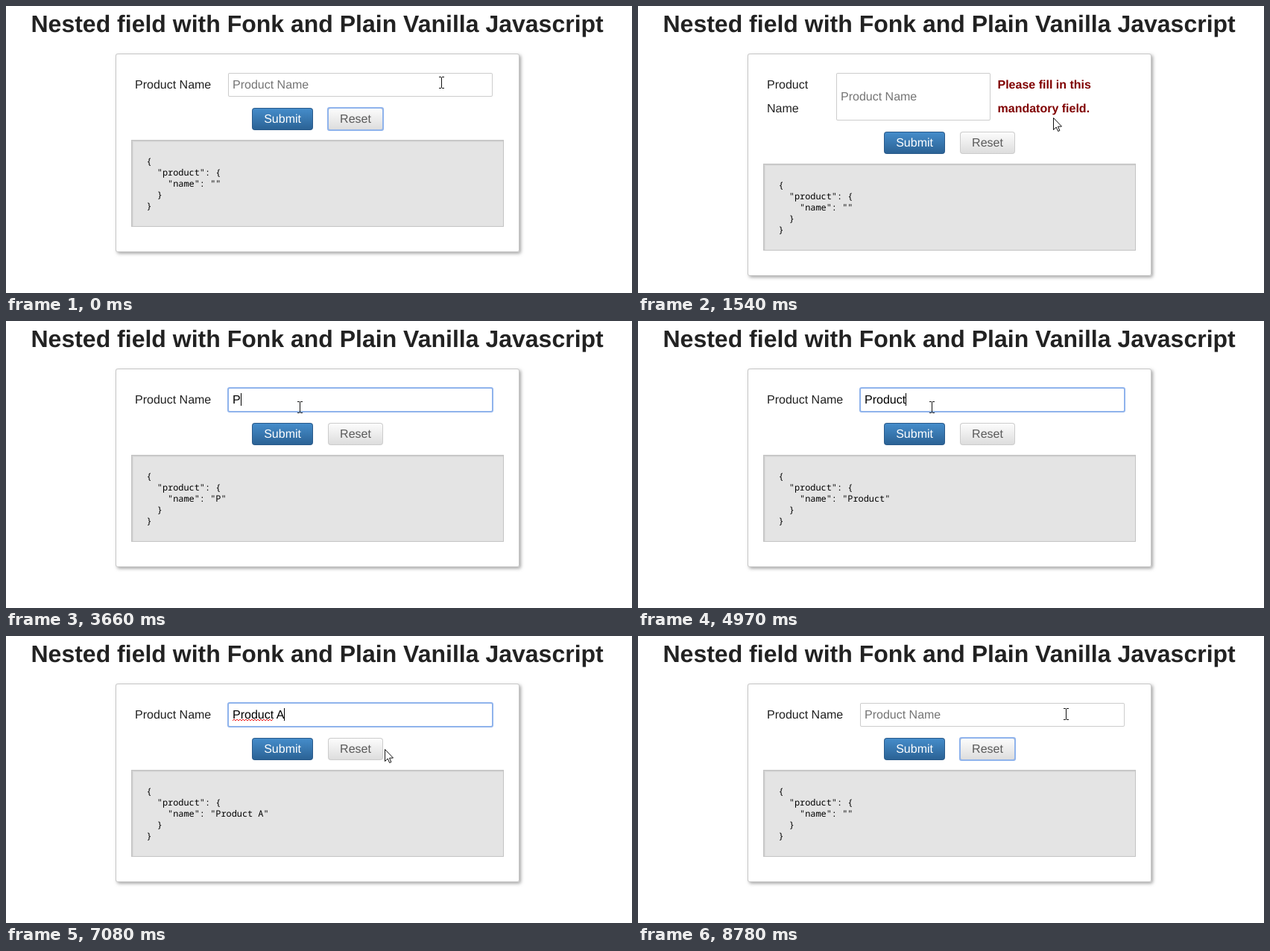
An HTML page with a canvas for the animation above (9090 ms loop, 840 by 386 pixels).

```html
<!DOCTYPE html>
<html lang="en">
<head>
<meta charset="utf-8">
<title>Nested field</title>
<style>
html, body { margin: 0; width: 100%; height: 100%; overflow: hidden; background: #fff; }
canvas { display: block; }
</style>
</head>
<body>
<canvas id="stage" width="840" height="386"></canvas>
<script>
const ctx = document.getElementById('stage').getContext('2d');
const SANS = '16px "Liberation Sans", Arial, sans-serif';
const MONO = '11.9px "Noto Sans Mono", monospace';
const LOOP = 9090;
const BLINK = 530;

// Pointer moves: start, end, number of steps, waypoints.
const moves = [
  { from: 920, to: 1220, steps: 5, path: [[584, 103], [576, 118], [557, 150]] },
  { from: 1860, to: 2180, steps: 5, path: [[557, 150], [535, 155], [470, 143], [394, 116]] },
  { from: 6300, to: 7160, steps: 12, hold: true,
    path: [[398, 116], [465, 118], [535, 138], [554, 153], [540, 155], [505, 152], [474, 148]] },
  { from: 7230, to: 7470, steps: 4, path: [[474, 148], [461, 147]] },
  { from: 7920, to: 8460, steps: 8, hold: true, path: [[461, 147], [485, 134], [530, 113], [583, 102]] },
  { from: 8630, to: 8780, steps: 3, path: [[583, 102], [574, 105]] }
];

// Value of the field and the time of each change.
const typing = [[3660, 'P'], [4120, 'Pr'], [4270, 'Pro'], [4420, 'Prod'], [4590, 'Produ'],
  [4740, 'Produc'], [4970, 'Product'], [5290, 'Product '], [5750, 'Product A'], [7920, '']];

const ticks = [0, 610, 1540, 2710, 3260, 5370, 7770, ...typing.map(([at]) => at)];
for (const m of moves) {
  for (let i = 0; i < m.steps; i++) ticks.push(m.from + (m.to - m.from) * i / (m.steps - 1));
}

const within = (t, a, b) => t >= a && t < b;

function along(path, p) {
  const at = p * (path.length - 1);
  const i = Math.min(Math.floor(at), path.length - 2);
  return path[i].map((v, axis) => Math.round(v + (path[i + 1][axis] - v) * (at - i)));
}

function pointerAt(t) {
  let pos = moves[0].path[0];
  for (const m of moves) {
    if (t < m.from) break;
    const step = Math.min(m.steps - 1, Math.round((t - m.from) / (m.to - m.from) * (m.steps - 1)));
    pos = along(m.path, m.hold ? step / (m.steps - 1) : (step + 1) / m.steps);
  }
  return pos;
}

function stateAt(time) {
  const t = Math.max(...ticks.filter(tick => tick <= time));
  const lastKey = typing.filter(([at]) => at <= t).pop();
  const focused = within(t, 610, 1540) || within(t, 2710, 7770);
  const blinkStart = Math.max(...[610, 2710, ...typing.map(([at]) => at)].filter(at => at <= t));
  return {
    value: lastKey ? lastKey[1] : '',
    error: within(t, 1540, 3660),
    focused,
    caret: focused && Math.floor((t - blinkStart) / BLINK) % 2 === 0,
    misspelt: within(t, 5370, 7770),
    resetFocused: t < 610 || t >= 7770,
    pointer: pointerAt(t)
  };
}

function text(str, x, y, color, font = SANS) {
  ctx.font = font;
  ctx.fillStyle = color;
  ctx.fillText(str, x, y);
}

function box(x, y, w, h, radius, fill, border) {
  ctx.beginPath();
  ctx.roundRect(x, y, w, h, radius);
  ctx.fillStyle = border;
  ctx.fill();
  ctx.beginPath();
  ctx.roundRect(x + 1, y + 1, w - 2, h - 2, Math.max(0, radius - 1));
  ctx.fillStyle = fill;
  ctx.fill();
}

function focusRing(x, y, w, h) {
  ctx.strokeStyle = '#8fb3ec';
  ctx.lineWidth = 2;
  ctx.beginPath();
  ctx.roundRect(x, y, w, h, 2);
  ctx.stroke();
}

function vertical(y, h, top, bottom) {
  const g = ctx.createLinearGradient(0, y, 0, y + h);
  g.addColorStop(0, top);
  g.addColorStop(1, bottom);
  return g;
}

function drawCard(height) {
  ctx.save();
  ctx.shadowColor = 'rgba(0,0,0,.35)';
  ctx.shadowBlur = 4;
  ctx.shadowOffsetX = ctx.shadowOffsetY = 2;
  ctx.fillStyle = '#fff';
  ctx.beginPath();
  ctx.roundRect(147, 64, 542, height, 3);
  ctx.fill();
  ctx.restore();
  box(147, 64, 542, height, 3, '#fff', '#c8c8c8');
}

function drawField(s, x, w, h) {
  box(x, 90, w, h, 2, '#fff', '#ccc');
  if (s.focused) focusRing(x, 90, w, h);
  const left = x + 6;
  const base = s.error ? 127 : 111;
  if (s.value) text(s.value, left, base, '#000');
  else text('Product Name', left, base, '#757575');
  if (s.misspelt) drawSquiggle(left, left + 55);
  if (s.caret) {
    ctx.font = SANS;
    ctx.fillStyle = '#000';
    ctx.fillRect(Math.round(left + ctx.measureText(s.value).width), s.error ? 114 : 97, 1, 17);
  }
}

function drawSquiggle(from, to) {
  ctx.strokeStyle = '#f02020';
  ctx.lineWidth = 1;
  ctx.beginPath();
  for (let x = from; x <= to; x += 2) ctx.lineTo(x, (x - from) % 4 ? 112 : 114);
  ctx.stroke();
}

function drawButtons(y, resetFocused) {
  box(330, y, 82, 30, 4, vertical(y, 30, '#468ecc', '#2a6193'), '#28598a');
  text('Submit', 346.2, y + 20, '#fff');
  box(432, y, 74, 30, 4, vertical(y, 30, '#fdfdfd', '#dcdcdc'), '#ccc');
  if (resetFocused) focusRing(432, y, 74, 30);
  text('Reset', 448.1, y + 20, '#5a5a5a');
}

function drawJson(y, value) {
  box(168, y, 500, 117, 0, '#e4e4e4', '#c3c3c3');
  ctx.fillStyle = 'rgba(0,0,0,.1)';
  ctx.fillRect(169, y + 1, 498, 1);
  ctx.fillRect(169, y + 2, 1, 114);
  ctx.fillStyle = 'rgba(0,0,0,.04)';
  ctx.fillRect(170, y + 2, 497, 1);
  ctx.fillRect(170, y + 3, 1, 113);
  JSON.stringify({ product: { name: value } }, null, 2).split('\n').forEach((line, i) => {
    const body = line.trimStart();
    text(body, 188.5 + (line.length - body.length) * 7.14, y + 33 + i * 15, '#000', MONO);
  });
}

function drawBeam(x, y) {
  ctx.fillStyle = '#111';
  for (const top of [y - 8, y + 7]) {
    ctx.fillRect(x - 3, top, 3, 1);
    ctx.fillRect(x + 1, top, 3, 1);
  }
  ctx.fillRect(x, y - 7, 1, 14);
}

function drawArrow(x, y) {
  const outline = [[0, 0], [0, 16], [3.7, 12.5], [6.2, 18], [8.4, 17], [6, 11.7], [11, 11.5]];
  ctx.beginPath();
  for (const [dx, dy] of outline) ctx.lineTo(x + dx + .5, y + dy + .5);
  ctx.closePath();
  ctx.fillStyle = '#fff';
  ctx.fill();
  ctx.strokeStyle = '#111';
  ctx.lineWidth = 1;
  ctx.stroke();
}

function draw(time) {
  const s = stateAt(time);
  const shift = s.error ? 32 : 0;
  const [fieldX, fieldW, fieldH] = s.error ? [266, 207, 64] : [298, 355, 32];

  ctx.fillStyle = '#fff';
  ctx.fillRect(0, 0, 840, 386);
  text('Nested field with Fonk and Plain Vanilla Javascript', 33.5, 35, '#222',
    'bold 32px "Liberation Sans", Arial, sans-serif');
  drawCard(267 + shift);

  if (s.error) {
    const bold = 'bold ' + SANS;
    text('Product', 173, 111, '#222');
    text('Name', 173, 143, '#222');
    text('Please fill in this', 482.5, 111, '#800000', bold);
    text('mandatory field.', 482.5, 143, '#800000', bold);
  } else {
    text('Product Name', 173, 111, '#222');
  }

  drawField(s, fieldX, fieldW, fieldH);
  drawButtons(137 + shift, s.resetFocused);
  drawJson(180 + shift, s.value);

  const [x, y] = s.pointer;
  const overField = within(x, fieldX, fieldX + fieldW) && within(y, 90, 90 + fieldH);
  (overField ? drawBeam : drawArrow)(x, y);
}

ctx.textRendering = 'geometricPrecision';
const start = performance.now();
function frame() {
  draw((performance.now() - start) % LOOP);
  requestAnimationFrame(frame);
}
frame();
</script>
</body>
</html>
```
